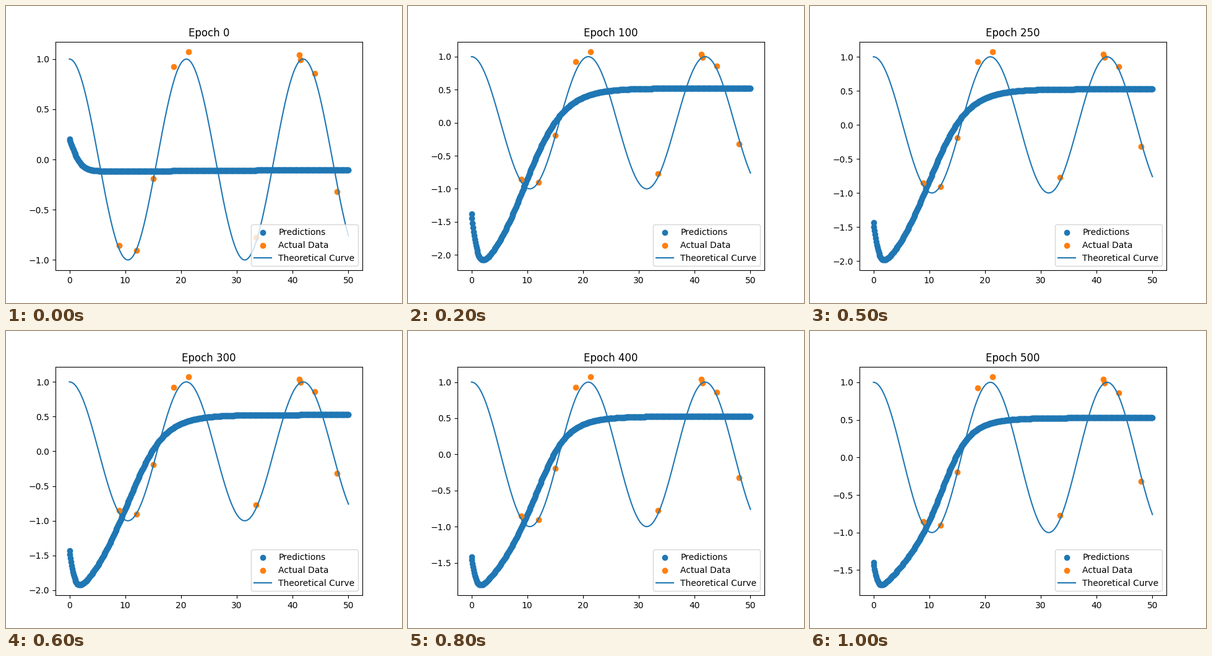
A matplotlib script for the animation above (1.1 s loop, 640x480 px).

```python
import numpy as np
import matplotlib.pyplot as plt
from matplotlib.animation import FuncAnimation

FRAMES, INTERVAL, EPOCH_STEP = 11, 100, 50

x = np.linspace(0, 50, 500)
theory = np.cos(0.3 * x)

samples = [(8.92, -0.855), (12.03, -0.906), (15.02, -0.191), (18.68, 0.924),
           (21.34, 1.07), (33.43, -0.775), (41.19, 1.04), (41.41, 0.99),
           (43.96, 0.857), (47.96, -0.32)]


def response(top, kick, tau, *steps):
    """Plateau with a decaying kick at x = 0 and (height, centre, width) rises."""
    y = top + kick * (1 - np.tanh(x / tau))
    for height, centre, width in steps:
        y = y - height / (1 + np.exp((x - centre) / width))
    return y


# What the model has learned by each key epoch
learned = {
    0: response(-0.104, 0.323, 2.0, (0.014, 24, 8)),
    50: response(0.412, 0.314, 1.1, (1.22, 11.5, 6.9)),
    100: response(0.521, 0.882, 1.17, (2.97, 9.45, 3.51)),
    200: response(0.525, 0.778, 1.14, (2.945, 9.38, 3.57)),
    500: response(0.528, 0.407, 0.84, (1.4, 6, 4.5), (1.23, 12.75, 2.15)),
}


def predict(epoch):
    """Blend linearly between the key epochs around this one."""
    keys = list(learned)
    i = min(np.searchsorted(keys, epoch, side="right"), len(keys) - 1)
    a, b = keys[i - 1], keys[i]
    t = (epoch - a) / (b - a)
    return (1 - t) * learned[a] + t * learned[b]


fig, ax = plt.subplots(figsize=(6.4, 4.8), dpi=100)


def update(frame):
    epoch = frame * EPOCH_STEP
    ax.clear()
    ax.scatter(x, predict(epoch), label="Predictions")
    ax.scatter(*zip(*samples), label="Actual Data")
    ax.plot(x, theory, label="Theoretical Curve")
    ax.set_title(f"Epoch {epoch}")
    ax.legend(loc="lower right")
    return []


anim = FuncAnimation(fig, update, frames=FRAMES, init_func=lambda: update(0),
                     interval=INTERVAL, repeat=True, repeat_delay=0)
plt.show()
```
